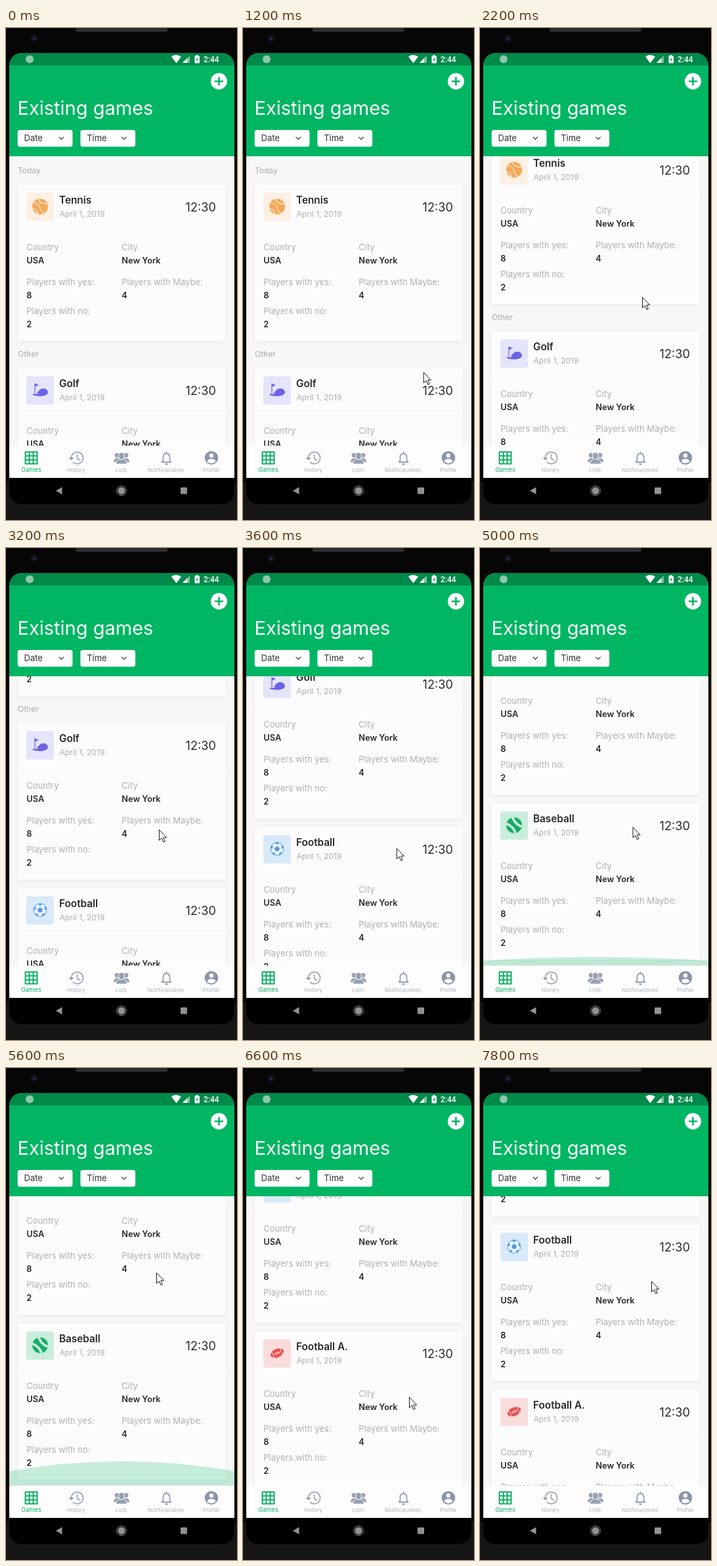
These frames come from a looping animation (352 px wide and 748 px high, 8000 ms). An HTML page:

```html
<!DOCTYPE html>
<html lang="en">
<head>
<meta charset="utf-8">
<title>Existing games</title>
<style>
  html, body { margin: 0; width: 100%; height: 100%; overflow: hidden; background: #060607; }
  svg { display: block; width: 100%; height: 100%; }
  text { font-family: Inter, Roboto, sans-serif; font-optical-sizing: none; }
  .title { font-size: 29px; fill: #fff; }
  .pick { font-size: 13px; fill: #303633; }
  .section { font-size: 12px; fill: #a9acac; }
  .name { font-size: 15.3px; font-weight: 600; fill: #262828; }
  .date { font-size: 12.1px; fill: #adafb0; }
  .hour { font-size: 18.2px; fill: #292b2c; text-anchor: end; }
  .label { font-size: 13px; fill: #b0b0b0; }
  .value { font-size: 12.8px; font-weight: 600; fill: #262829; }
  .tab { font-size: 8.2px; fill: #a9afb9; text-anchor: middle; }
  .tab.on { font-size: 9.3px; fill: #12b068; }
  .clock { font: 500 12px Roboto, sans-serif; fill: #fff; }
  .line { fill: none; stroke-linecap: round; stroke-linejoin: round; }
</style>
</head>
<body>
<svg viewBox="0 0 352 748">
  <defs>
    <clipPath id="screen"><rect x="5" y="38" width="343" height="686" rx="19"/></clipPath>
    <clipPath id="list"><rect x="5" y="195" width="343" height="440"/></clipPath>
    <filter id="soft" x="-5%" y="-5%" width="110%" height="112%">
      <feDropShadow dx="0" dy="2" stdDeviation="3" flood-color="#000" flood-opacity=".05"/>
    </filter>

    <g id="icon0">
      <circle r="12" fill="#f5aa5b"/>
      <path class="line" d="M-10-6Q-1-5 0 2T7 10M-3-12Q-1-4 11-4M-12 3Q-5 3-4 11" stroke="#fdeedd" stroke-width="1.2"/>
    </g>
    <g id="icon1" fill="#6c62e6">
      <path d="M-12 7C-8 4-5 5-2 1C2-5 11-3 12 3C12 8 4 10-3 9Q-8 9-12 7Z"/>
      <path d="M-8-10L-2-7.5L-8-5Z"/>
      <path class="line" d="M-8-10V4" stroke="#6c62e6" stroke-width="1.2"/>
      <ellipse cx="-6" cy="5" rx="3" ry="1" fill="#dddcfa"/>
    </g>
    <g id="icon2" fill="#4a94e2">
      <circle r="10" fill="#e4f0fc" stroke="#5a9fe6"/>
      <path d="M0-4L3.800-1.200L2.400 3.200H-2.400L-3.800-1.200Z"/>
    </g>
    <g id="icon3" transform="rotate(-24)">
      <path d="M-11 0Q-9-6 0-6.500Q9-6 11 0Q9 6 0 6.500Q-9 6-11 0Z" fill="#e9504f"/>
      <path class="line" d="M-4 0H4M-2.500-1.800V1.800M0-1.800V1.800M2.500-1.800V1.800M-7-4.500Q-5.500 0-7 4.500M7-4.500Q5.500 0 7 4.500" stroke="#fbdedd"/>
    </g>
    <g id="icon4" transform="rotate(-45)">
      <circle r="12" fill="#16ad66"/>
      <path class="line" d="M-7-10Q-2 0-7 10M7-10Q2 0 7 10" stroke="#c9eedc" stroke-width="4" stroke-dasharray="1 2" stroke-linecap="butt"/>
    </g>
  </defs>

  <!-- phone body -->
  <rect y="690" width="352" height="58" fill="#151515"/>
  <path d="M106 0H246V3Q246 6 242 6H110Q106 6 106 3Z" fill="#2c2c2e"/>
  <circle cx="43" cy="16" r="6.500" fill="#0f0f16"/>
  <circle cx="43" cy="16" r="2.300" fill="#27284f"/>

  <g clip-path="url(#screen)">
    <rect x="5" y="38" width="343" height="686" fill="#000"/>
    <rect x="5" y="195" width="343" height="440" fill="#f7f7f7"/>
    <g clip-path="url(#list)">
      <g id="content">
        <text class="section" x="18" y="221">Today</text>
        <text class="section" x="18" y="500">Other</text>
      </g>
      <path id="glow" d="M5 15Q176.500-15 348 15V37H5Z" fill="#00b562" fill-opacity=".22"/>
    </g>

    <!-- header -->
    <rect x="5" y="38" width="343" height="157" fill="#00b663"/>
    <rect x="5" y="38" width="343" height="19" fill="#01894a"/>
    <circle cx="36" cy="47.500" r="6" fill="#8cc7a8"/>
    <path d="M252 43.500Q259.500 38.500 267 43.500L259.500 53.500Z" fill="#fff"/>
    <path d="M280 42V53H269Z" fill="#7fc3a1"/>
    <path d="M276 46V53H269Z" fill="#fff"/>
    <path d="M289.500 42.500V41H292.500V42.500H295V53.500H287.500V42.500Z" fill="#fff"/>
    <path d="M292 44.500L289.500 48.500H291L290.500 51.500L293 47.500H291.500Z" fill="#01894a"/>
    <text class="clock" x="301" y="52">2:44</text>
    <circle cx="324.500" cy="81" r="12.500" fill="#fff"/>
    <path class="line" d="M319 81H330M324.500 75.500V86.500" stroke="#00b663" stroke-width="2.600"/>
    <text class="title" x="17.500" y="132">Existing games</text>
    <g id="picks"></g>

    <!-- tabs -->
    <rect x="5" y="635" width="343" height="49" fill="#fdfdfd"/>
    <path class="line" d="M29.500 644.500h18v18h-18zM35.500 644.500v18M41.500 644.500v18M29.500 650.500h18M29.500 656.500h18" stroke="#0fae65" stroke-width="2"/>
    <g fill="#98a1b0">
      <path class="line" d="M99.500 653.500A9 9 0 1 1 102.500 660.300M108.500 648.500V654.500L112.500 657" stroke="#a0a7b3" stroke-width="1.700"/>
      <path d="M95.500 653H103.500L99.500 657.500Z"/>
      <circle cx="169" cy="649.500" r="3.400"/>
      <circle cx="183" cy="649.500" r="3.400"/>
      <path d="M164 660Q164 654 169 654H183Q188 654 188 660Z"/>
      <g stroke="#fdfdfd">
        <path d="M167.500 663Q167.500 656.500 173 655.500H179Q184.500 656.500 184.500 663Z"/>
        <ellipse cx="176" cy="650.500" rx="4.500" ry="5.500"/>
      </g>
      <path class="line" d="M237.500 660H251.500L249.500 657.500V652.500Q249.500 647 244.500 647T239.500 652.500V657.500ZM244.500 644.500V646" stroke="#98a1b0" stroke-width="1.800"/>
      <path d="M242 662H247Q246.500 664.500 244.500 664.500T242 662Z"/>
      <circle cx="313" cy="653.500" r="10.300" fill="#8b95a6"/>
      <g fill="#fdfdfd">
        <circle cx="313" cy="650" r="3.200"/>
        <path d="M306.500 658.500Q308 655 313 655T319.500 658.500Q317 661.800 313 661.800T306.500 658.500Z"/>
      </g>
    </g>
    <g id="tabs"></g>

    <!-- system bar -->
    <g fill="#929292">
      <path d="M76 703.500L85.500 698V709Z"/>
      <circle cx="176" cy="703.500" r="5.500"/>
      <circle cx="176" cy="703.500" r="7.200" fill="none" stroke="#929292"/>
      <rect x="266" y="698.500" width="10" height="10" rx="1"/>
    </g>
  </g>

  <path id="cursor" d="M0 0V16L3.800 12.500L6.400 18.600L8.900 17.500L6.300 11.600H11.200Z" fill="#fff" stroke="#161616" stroke-linejoin="round"/>
</svg>
<script>
const LOOP = 8000, STEP = 200;
const $ = id => document.getElementById(id);
const add = (id, markup) => $(id).insertAdjacentHTML('beforeend', markup);
const text = (cls, x, y, str) => `<text class="${cls}" x="${x}" y="${y}">${str}</text>`;

const games = { 'Tennis': '#fcf0e4', 'Golf': '#e4e4fa', 'Football': '#d8e9fa', 'Football A.': '#fadcdc', 'Baseball': '#c9eedc' };
const fields = { 'Country': 'USA', 'City': 'New York', 'Players with yes:': 8, 'Players with Maybe:': 4, 'Players with no:': 2 };
const rows = [99.5, 152.5, 196.5];

// two fields per row
const details = Object.entries(fields).map(([label, value], i) => {
  const x = 31.3 + 145 * (i % 2), y = rows[i >> 1];
  return text('label', x, y, label) + text('value', x, y + 20, value);
}).join('');

// cards are 251 apart; a section heading adds 28 after the first
Object.entries(games).forEach(([name, tile], i) => add('content',
  `<g transform="translate(0 ${238 + 251 * i + (i ? 28 : 0)})">
    <rect x="18" width="317" height="238" rx="3" fill="#fcfcfc" filter="url(#soft)"/>
    <rect x="31" y="12.5" width="42" height="43" rx="3" fill="${tile}"/>
    <use href="#icon${i}" transform="translate(52 33.5)"/>
    <path d="M18 72.5H335" stroke="#f6f6f6"/>
    ${text('name', 81, 29.3, name)}${text('date', 81.5, 49, 'April 1, 2019')}${text('hour', 320, 40.5, '12:30')}
    ${details}
  </g>`));

for (let i = 0; i < 5; i++)
  add('icon2', `<path d="M-2.600-9.500H2.600L1.500-7.200H-1.500Z" transform="rotate(${i * 72})"/>`);

['Date', 'Time'].forEach((label, i) => {
  const x = 17.7 + 95.7 * i;
  add('picks', `<rect x="${x}" y="155" width="83.700" height="25.500" rx="3.500" fill="#fdfdfd"/>
    ${text('pick', x + 9.8, 172, label)}
    <path class="line" d="M${x + 63.3} 166l3.300 3.300l3.300-3.300" stroke="#4a504d" stroke-width="1.300"/>`);
});

['Games', 'History', 'Lists', 'Notificaciones', 'Profile'].forEach((label, i) =>
  add('tabs', text(i ? 'tab' : 'tab on', 38.5 + i * 68.5, 675.3, label)));

const clamp = u => Math.min(1, Math.max(0, u));
const part = (t, start, span) => clamp((t - start) / span);
const smooth = u => u * u * (3 - 2 * u);
const inOut = u => u < .5 ? 4 * u ** 3 : 1 - 4 * (1 - u) ** 3;
const out = u => 1 - (1 - u) ** 2;

// two swipes down the list, then a fling back up
const scrollAt = t =>
  251 * inOut(part(t, 1600, 1570)) +
  631 * inOut(part(t, 3200, 1200)) -
  352 * out(part(t, 5800, 1610));

// overscroll swells slowly and fades fast
const glowAt = t => smooth(part(t, 4600, 1000)) * (1 - smooth(part(t, 5600, 600)));

// resting points of the pointer: time, x, y
const stops = [[600, 340, 567], [1600, 240, 500], [2200, 247.5, 409.5], [3200, 233.5, 428.5],
  [4400, 236.5, 537.5], [5600, 229.5, 311.5], [6600, 253.5, 500.5], [7600, 261, 304], [7800, 261.5, 324.5]];

function pointerAt(t) {
  let [start, x, y] = stops[0];
  for (const [end, nx, ny] of stops.slice(1)) {
    const k = smooth(part(t, start, end - start));
    x += (nx - x) * k;
    y += (ny - y) * k;
    start = end;
  }
  return `${x} ${y}`;
}

const move = (id, value) => $(id).setAttribute('transform', value);
const show = (id, on) => $(id).setAttribute('visibility', on ? 'visible' : 'hidden');

const begin = performance.now();
function draw() {
  const t = Math.floor((performance.now() - begin) % LOOP / STEP) * STEP;
  const glow = glowAt(t);
  move('content', `translate(0 ${-Math.round(scrollAt(t))})`);
  move('cursor', `translate(${pointerAt(t)})`);
  move('glow', `translate(0 ${635 - 37 * glow}) scale(1 ${glow})`);
  show('cursor', t >= 600);
  show('glow', glow > 0);
  requestAnimationFrame(draw);
}
draw();
</script>
</body>
</html>
```
